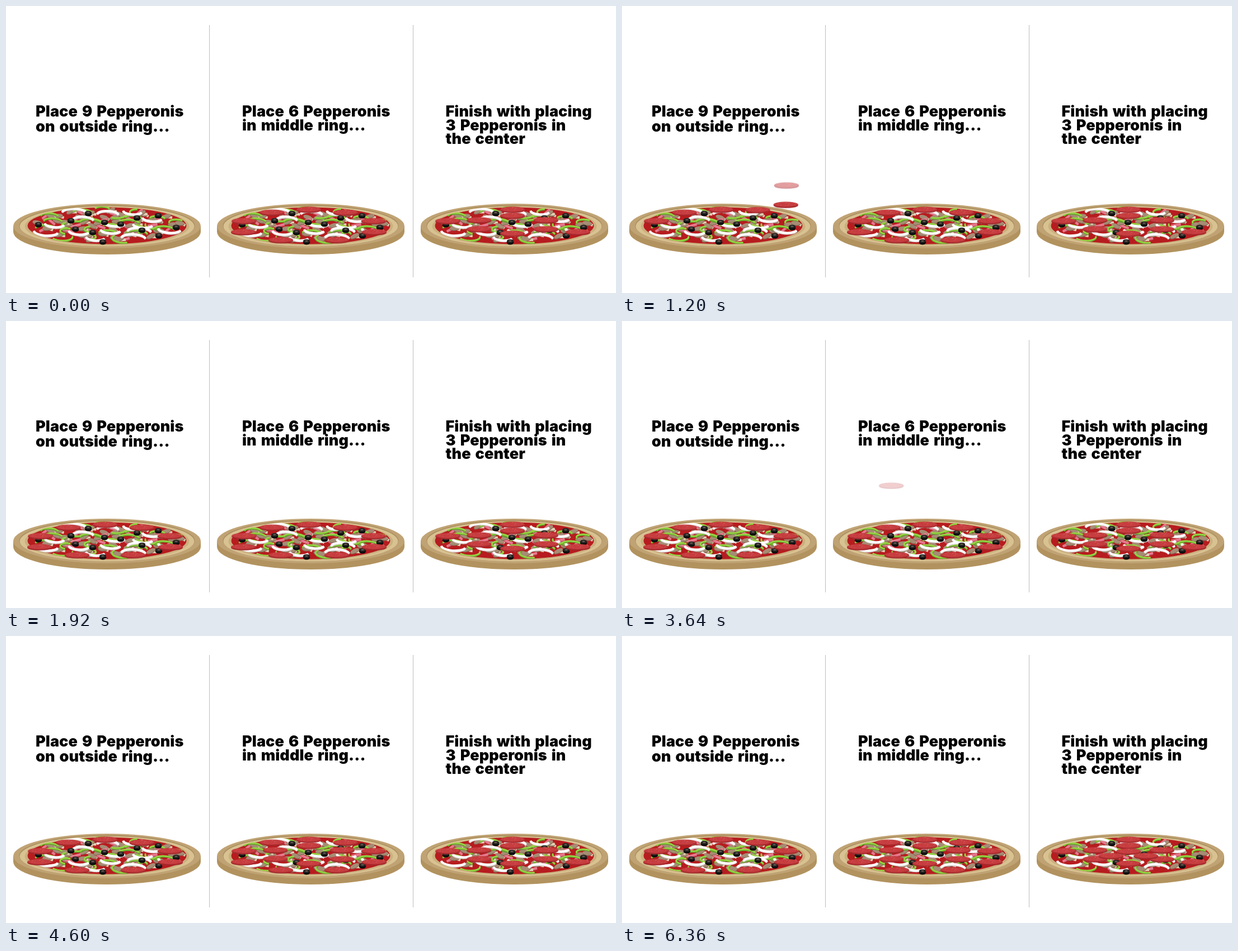
Recreate the animation shown at these times as an HTML page with a canvas. Size 1090 by 514 pixels, loop 8000 ms.

```html
<!DOCTYPE html>
<html lang="en">
<head>
<meta charset="utf-8">
<title>Pepperoni placement</title>
<style>
  html, body { margin: 0; width: 100%; height: 100%; overflow: hidden; background: #fff; }
  canvas { display: block; }
</style>
</head>
<body>
<canvas id="stage" width="1090" height="514"></canvas>
<script>
const W = 1090, H = 514, LOOP = 8000, TICK = 40;
const STAGGER = 120, LEAD = 40, FALL = 440, FADE = 160, DROP = 90;
const PANEL_W = 364.2, CX = 180.5;
const TAU = Math.PI * 2;
const ctx = document.getElementById('stage').getContext('2d');

// n slices clockwise around the pizza; the near side is wider by `depth`
function ring(n, first, cy, rx, ry, depth = 0, lift = 0) {
  return Array.from({ length: n }, (_, i) => {
    const a = (first + i) * TAU / n, s = Math.sin(a), c = Math.cos(a);
    return [177 + (rx - depth * c) * s, cy - ry * c - lift * s * s];
  });
}

const outer = ring(9, -2, 392.4, 122, 28.4, 26, 3);
const middle = ring(6, -1, 391, 69, 16);
const center = ring(3, 0, 390.8, 36, 5.3);
const visibleOuter = outer.filter((_, i) => [0, 2, 5].includes(i));

const steps = [
  { start: 560, base: [], drops: outer,
    x: 53, lead: 27, lines: ['Place 9 Pepperonis', 'on outside ring...'] },
  { start: 3640, base: outer, drops: middle,
    x: 422, lead: 24.7, lines: ['Place 6 Pepperonis', 'in middle ring...'] },
  { start: 5720, base: [...visibleOuter, ...middle], drops: center,
    x: 785.5, lead: 24.7, lines: ['Finish with placing', '3 Pepperonis in', 'the center'] }
];

function random(seed) {
  return () => (seed = (seed * 16807) % 2147483647) / 2147483647;
}

function layer(w, h, paint) {
  const c = document.createElement('canvas');
  c.width = w;
  c.height = h;
  paint(c.getContext('2d'));
  return c;
}

function oval(g, x, y, rx, ry, fill, turn = 0) {
  g.fillStyle = fill;
  g.beginPath();
  g.ellipse(x, y, rx, ry, turn, 0, TAU);
  g.fill();
}

function arc(g, x, y, r, from, color, width) {
  g.strokeStyle = color;
  g.lineWidth = width;
  g.beginPath();
  g.ellipse(x, y, r, r * 0.38, 0.06, from, from + 2.7);
  g.stroke();
}

function bar(g, x, y, len, turn, color, width = 4) {
  const dx = len * Math.cos(turn), dy = len * Math.sin(turn) * 0.6;
  g.strokeStyle = color;
  g.lineWidth = width;
  g.beginPath();
  g.moveTo(x - dx, y - dy);
  g.lineTo(x + dx, y + dy);
  g.stroke();
}

// Toppings; each takes a seeded random source for its pose
function mushroom(g, x, y, rnd) {
  const turn = rnd() - 0.5;
  bar(g, x + 5, y + 2, 6, turn + 0.5, '#e2d0b4', 4.5);
  oval(g, x, y + 1.3, 8.5, 3.5, '#846a55', turn);
  oval(g, x, y, 8.5, 3.5, '#a68c74', turn);
}

function ham(g, x, y, rnd) {
  const turn = rnd() * 2 - 1;
  bar(g, x, y + 1.3, 9, turn, '#c04a5c');
  bar(g, x, y, 9, turn, '#e8788d');
}

function pepper(g, x, y, rnd) {
  const r = 13 + rnd() * 7, from = rnd() < 0.6 ? 3.3 : rnd() * TAU;
  arc(g, x, y + 1.5, r, from, '#5f9c27', 2.6);
  arc(g, x, y, r, from, '#97d443', 2.8);
}

function onion(g, x, y, rnd) {
  const r = 17 + rnd() * 6, from = rnd() < 0.5 ? 3.3 : 0.3;
  arc(g, x, y + 1.5, r, from, '#d6cccb', 3.6);
  arc(g, x, y, r, from, '#fff', 4);
}

function olive(g, x, y) {
  oval(g, x, y + 1.5, 6.3, 4, '#0c0c0c');
  oval(g, x, y - 1, 6.2, 3.3, '#242424');
  oval(g, x, y - 1.2, 2.6, 1.3, '#6a5a50');
}

// Even spread over the sauce by the golden angle, far pieces first
function scatter(g, put, n, phase) {
  const rnd = random(1000 + n * 37);
  Array.from({ length: n }, (_, i) => {
    const a = phase + i * 2.39996, r = Math.sqrt((i + 0.5) / n);
    return [CX + 133 * r * Math.cos(a), 391.5 + 28 * r * Math.sin(a)];
  }).sort((p, q) => p[1] - q[1]).forEach(([x, y]) => put(g, x, y, rnd));
}

function paintPizza(g) {
  oval(g, CX, 404.5, 167.5, 40.5, '#b2935f');
  g.fillStyle = '#b2935f';
  g.fillRect(13, 394, 335, 10.5);
  oval(g, CX, 394, 167.5, 40, '#c0a374');
  oval(g, CX, 393.5, 157, 37, '#ab8f5f');
  oval(g, CX, 394.5, 156, 36, '#d9c292');
  oval(g, CX, 394.5, 147, 34, '#cbb07e');
  oval(g, CX, 393.5, 142, 33, '#b71c1f');

  g.save();
  g.beginPath();
  g.ellipse(CX, 393, 144, 34, 0, 0, TAU);
  g.clip();
  scatter(g, mushroom, 34, 0.4);
  scatter(g, ham, 20, 2.1);
  scatter(g, mushroom, 15, 4);
  scatter(g, pepper, 26, 1.2);
  scatter(g, onion, 15, 5.3);
  g.restore();

  const olives = [[147, 371], [272, 375], [234, 379], [116, 384], [176, 387], [205, 390],
    [58, 391], [304, 396], [124, 399], [243, 401], [155, 405], [273, 411], [173, 422]];
  for (const [x, y] of olives) olive(g, x, y);
}

function paintSlice(g) {
  oval(g, 24, 9, 22, 4.8, '#a3282c');
  oval(g, 24, 7.3, 22, 4.7, '#b83236');
  oval(g, 24, 7, 21, 4.2, '#c83e40');
  const rnd = random(91);
  for (let i = 0; i < 26; i++) {
    const a = rnd() * TAU, r = Math.sqrt(rnd());
    oval(g, 24 + 19 * r * Math.cos(a), 7 + 3.6 * r * Math.sin(a),
      0.9, 0.45, i % 2 ? '#da6a68' : '#b23035');
  }
}

const pizza = layer(364, H, paintPizza);
const slice = layer(48, 16, paintSlice);

// Cubic Bezier (.48, 0, .2, 1), solved by bisection
function ease(u) {
  if (u >= 1) return 1;
  let lo = 0, hi = 1;
  for (let i = 0; i < 20; i++) {
    const s = (lo + hi) / 2, q = 1 - s;
    if (1.44 * q * q * s + 0.6 * q * s * s + s * s * s < u) lo = s;
    else hi = s;
  }
  return lo * lo * (3 - 2 * lo);
}

function drawSlice(x, y) {
  ctx.drawImage(slice, x - 24, y - 7.3);
}

function drawText({ x, lead, lines }) {
  ctx.fillStyle = '#000';
  lines.forEach((line, i) => ctx.fillText(line, x, 198 + i * lead));
}

function drawStep({ start, base, drops }, t) {
  ctx.drawImage(pizza, 0, 0);
  for (const [x, y] of base) drawSlice(x, y);
  drops.forEach(([x, y], i) => {
    const age = t - start - i * STAGGER + LEAD;
    if (age < LEAD) return;
    ctx.globalAlpha = Math.min(1, age / FADE);
    drawSlice(x, y - DROP * (1 - ease(age / FALL)));
  });
  ctx.globalAlpha = 1;
}

function draw(t) {
  ctx.fillStyle = '#fff';
  ctx.fillRect(0, 0, W, H);
  ctx.fillStyle = '#bdbdbd';
  ctx.fillRect(363, 34, 1, 452);
  ctx.fillRect(727, 34, 1, 452);
  ctx.font = '900 27px Inter, "Open Sans", sans-serif';
  ctx.letterSpacing = '0.1px';
  ctx.wordSpacing = '2.5px';
  steps.forEach((step, i) => {
    drawText(step);
    ctx.save();
    ctx.translate(Math.round(i * PANEL_W), 0);
    drawStep(step, t);
    ctx.restore();
  });
}

const began = performance.now();
function tick() {
  const t = (performance.now() - began) % LOOP;
  draw(Math.floor(t / TICK) * TICK);
  requestAnimationFrame(tick);
}
tick();
</script>
</body>
</html>
```
